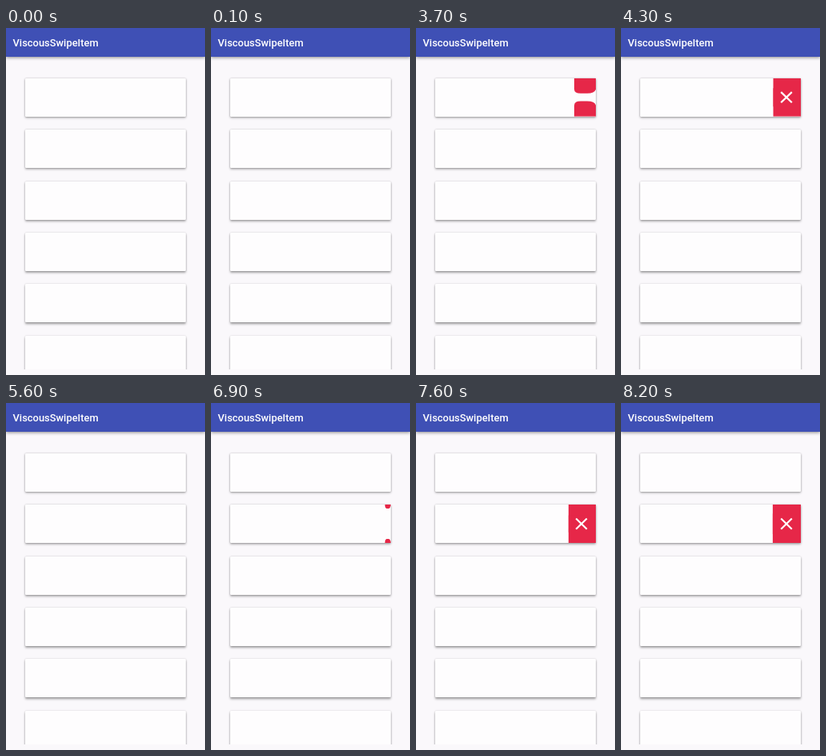
These frames come from a looping animation (249 px wide and 434 px high, 8300 ms). An HTML page:

```html
<!DOCTYPE html>
<html lang="en">
<head>
<meta charset="utf-8">
<title>ViscousSwipeItem</title>
<style>
  html, body { margin: 0; width: 100%; height: 100%; overflow: hidden; background: #faf8fb; }
  #stage { position: absolute; left: 0; top: 0; width: 249px; height: 434px; overflow: hidden; background: #faf8fb; }
  header {
    position: absolute; left: 0; top: 0; width: 249px; height: 36px;
    background: #3f50b5; box-shadow: 0 1px 4px rgba(0, 0, 0, .45);
  }
  #list { position: absolute; left: 0; top: 40px; width: 249px; height: 387px; overflow: hidden; }
  .card { position: absolute; left: 24px; width: 201px; height: 48px; background: #fefdfe; border-radius: 1px; }
  svg { position: absolute; left: 0; top: 0; }
  text { font: 500 12.9px Roboto, sans-serif; fill: #fff; }
</style>
</head>
<body>
<div id="stage">
  <div id="list"></div>
  <header></header>
  <svg id="art" width="249" height="434" viewBox="0 0 249 434">
    <text x="8.5" y="23">ViscousSwipeItem</text>
  </svg>
</div>
<script>
const LOOP = 8300, STEP = 100;
const RIGHT = 225, TOP = 62.7, PITCH = 64.4, HEIGHT = 48, RED = '#e62748';
const NS = 'http://www.w3.org/2000/svg';
const art = document.getElementById('art');
const list = document.getElementById('list');

// touch: finger lands, pull: drag begins, tau: how slowly it settles at full width
const swipes = [
  { row: 0, touch: 3200, pull: 3180, end: 5600, full: 36.5, tau: 386 },
  { row: 1, touch: 5800, pull: 6850, end: LOOP, full: 35.2, tau: 213 }
];

const clamp = (v, lo = 0, hi = 1) => Math.min(hi, Math.max(lo, v));

function add(tag, attrs, parent = art) {
  const el = document.createElementNS(NS, tag);
  for (const key in attrs) el.setAttribute(key, attrs[key]);
  return parent.appendChild(el);
}

for (let i = 0; i < 6; i++) {
  const card = document.createElement('div');
  card.className = 'card';
  card.style.top = TOP - 40 + i * PITCH + 'px';
  card.style.boxShadow =
    `0 ${1.2 + i * .25}px 3px rgba(0,0,0,.36), 0 0 2px rgba(0,0,0,.18)`;
  list.append(card);
}

for (const s of swipes) {
  s.top = TOP + s.row * PITCH;
  const id = 'clip' + s.row;
  add('rect', { x: 24, y: s.top, width: RIGHT - 24, height: HEIGHT }, add('clipPath', { id }));
  s.group = add('g', { 'clip-path': `url(#${id})` });
  s.upper = add('path', { fill: RED }, s.group);
  s.lower = add('path', { fill: RED }, s.group);
  const y = s.top + HEIGHT / 2;
  s.cross = add('path', {
    d: `M200.2 ${y - 6.6}l13.6 13.2m0-13.2l-13.6 13.2`,
    stroke: '#fff', 'stroke-width': 2.2, fill: 'none'
  }, s.group);
}

function pullWidth(s, t) {
  const nudge = 1 + 1.5 * clamp((t - s.touch) / 200);
  const drag = s.full * (1 - Math.exp(-(t - s.pull) / s.tau));
  return Math.max(nudge, drag);
}

// The halves sink with the pull, then rush together near the end
const depth = w => .68 * w + 1.5 * Math.max(0, w - 26.5);

// One half of the pull, hanging from edge y; dir is 1 for down and -1 for up
function half(y, dir, w, h) {
  const left = RIGHT - w;
  const cl = clamp(HEIGHT / 2 - h + .5, 0, h);
  const cr = Math.min(h, 5);
  const at = d => y + dir * d;
  const rl = Math.min(w * .35, cl * 1.5), rr = w * .4;
  return `M${left} ${y}V${at(h - cl)}Q${left} ${at(h)} ${left + rl} ${at(h)}` +
    `H${RIGHT - rr}Q${RIGHT - rr * .15} ${at(h)} ${RIGHT} ${at(h - cr)}V${y}Z`;
}

function draw(now) {
  const t = Math.floor((now % LOOP) / STEP) * STEP;
  for (const s of swipes) {
    const on = t >= s.touch && t < s.end;
    s.group.style.display = on ? '' : 'none';
    if (!on) continue;
    const w = pullWidth(s, t), h = depth(w);
    s.upper.setAttribute('d', half(s.top, 1, w, h));
    s.lower.setAttribute('d', half(s.top + HEIGHT, -1, w, h));
    s.cross.setAttribute('opacity', clamp((w - 32) / 1.5));
  }
}

const start = performance.now();
function tick() {
  draw(performance.now() - start);
  requestAnimationFrame(tick);
}
tick();
</script>
</body>
</html>
```
